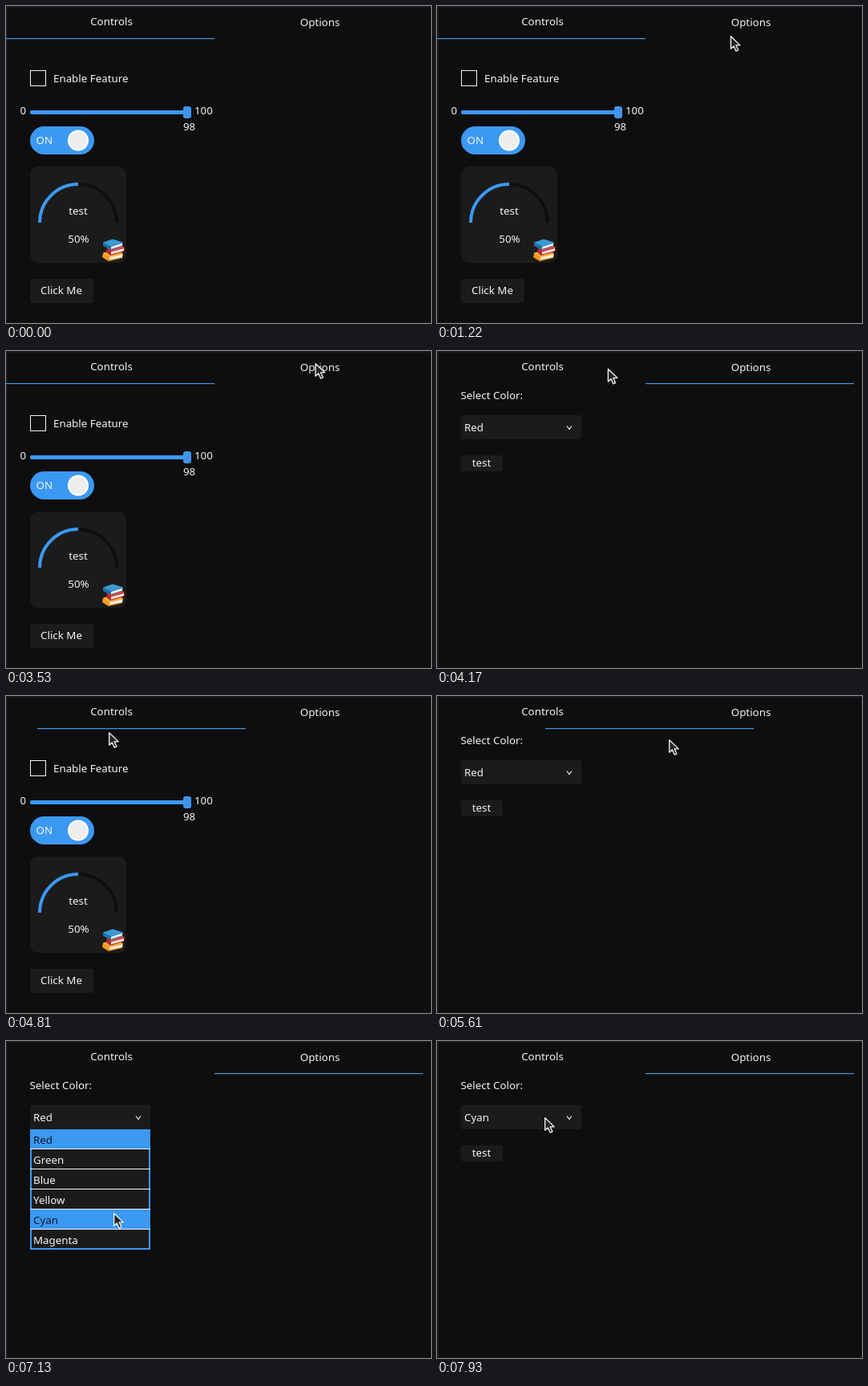
Recreate the animation shown at these times as an HTML page. Size 530 by 395 pixels, loop 8000 ms.

```html
<!DOCTYPE html>
<html lang="en">
<head>
<meta charset="utf-8">
<title>Widget panel</title>
<style>
html, body { margin: 0; width: 100%; height: 100%; overflow: hidden; background: #0e0e0e; }
svg { display: block; width: 530px; height: 395px; }
text { font: 13.33px "Noto Sans", "Open Sans", sans-serif; fill: #f4f4f4; white-space: pre; }
.mid { text-anchor: middle; }
.blue { fill: #3b99f4; }
.card { fill: #1b1b1b; }
</style>
</head>
<body>
<svg viewBox="0 0 530 395" xmlns="http://www.w3.org/2000/svg">
  <defs><clipPath id="clip"><rect id="clipBox" x="29" y="110" width="152" height="150"/></clipPath></defs>
  <rect width="530" height="395" fill="#0e0e0e"/>
  <path d="M0 0H530V2H2V395H0Z" fill="#1a1a1a"/>
  <rect y="393" width="530" height="2" fill="#170f12"/>

  <text class="mid" x="131.5" y="24">Controls</text>
  <text class="mid" x="391.5" y="25">Options</text>
  <rect id="line" y="40" width="260" height="1.2"/>

  <g id="controls">
    <rect x="30.5" y="80.5" width="19" height="19" fill="none" stroke="#f4f4f4"/>
    <text x="59" y="95">Enable Feature</text>

    <text x="17.5" y="135">0</text>
    <text x="235" y="135">100</text>
    <rect class="blue" x="30" y="130" width="196" height="5" rx="2"/>
    <rect x="221" y="125" width="10" height="15" rx="3" fill="#4095ea"/>
    <text class="mid" x="228.5" y="155">98</text>

    <rect id="pill" x="30" y="150" width="80" height="35" rx="17.5"/>
    <text id="on" x="37.5">ON</text>
    <text id="off" class="mid" x="85">OFF</text>
    <g id="knob"><circle r="13" fill="#fff"/><circle r="11" fill="#eee"/></g>

    <rect class="card" x="30" y="200" width="120" height="120" rx="10"/>
    <g fill="none" stroke-width="4">
      <path d="M90 222A48 48 0 0 1 138 270" stroke="#0e0e0e"/>
      <path d="M42 270A48 48 0 0 1 90 222" stroke="#3b99f4"/>
    </g>
    <text class="mid" x="90" y="260">test</text>
    <text class="mid" x="90.5" y="295">50%</text>

    <g id="books">
      <path d="M121 308L139 304L146 309L145 314L128 318L120 313Z" fill="#f39a1f"/>
      <path d="M129 313L145 309.5V313L129 316Z" fill="#f2eee4"/>
      <path d="M121 307.5L138 303.5L146 308.5L128 312.5Z" fill="#fbb53c"/>
      <path d="M126 301L141 296L148 302L147 306L130 311L125 307Z" fill="#b5282f"/>
      <path d="M131 306.5L147 302V305L131 309.5Z" fill="#f2e8e4"/>
      <path d="M126 300.5L141 296L148 301L131 306Z" fill="#dc4a45"/>
      <path d="M121 295L133 291L146 295L145 299L131 304L121 299Z" fill="#1d6fa8"/>
      <path d="M131 300L145 295.5V298.5L131 303Z" fill="#e9eff2"/>
      <path d="M121 294.5L133 290.5L146 294.5L131 299.5Z" fill="#3a9bd5"/>
    </g>

    <rect class="card" x="30" y="340" width="79" height="30" rx="2"/>
    <text class="mid" x="69" y="359">Click Me</text>
  </g>

  <g id="options">
    <text x="29.5" y="60">Select Color:</text>
    <rect class="card" x="30" y="80" width="150" height="30" rx="2"/>
    <text id="value" x="34" y="100"></text>
    <path d="M162 93.5L165 97.5L168 93.5" fill="none" stroke="#f4f4f4" stroke-width="1.2"/>
    <rect class="card" x="30" y="130" width="52" height="20" rx="2"/>
    <text class="mid" x="55.5" y="144">test</text>
    <g id="menu" clip-path="url(#clip)"></g>
  </g>

  <path id="cursor" d="M.7 .8V16.3L4.3 13L7.2 19.2L10 18L7.2 11.9H12.2Z" fill="#262626" stroke="#f6f6f6" stroke-width="1.3" stroke-linejoin="round"/>
</svg>
<script>
const $ = id => document.getElementById(id);
const set = (el, attrs) => { for (const k in attrs) el.setAttribute(k, attrs[k]); };
const clamp = v => Math.max(0, Math.min(1, v));
const span = (t, start, len) => clamp((t - start) / len);
const inOut = u => u < .5 ? 2 * u * u : 1 - 2 * (1 - u) ** 2;

const LOOP = 8000, STEP = 80;
const COLORS = ['Red', 'Green', 'Blue', 'Yellow', 'Cyan', 'Magenta'];

// pointer path: time, x, y
const PATH = [
  [260, 518, 318], [500, 310, 220], [660, 206, 110], [860, 320, 50], [1060, 408, 23],
  [1140, 411, 16], [1460, 230, 100], [1700, 90, 158], [1940, 66, 166], [2180, 65.5, 166],
  [2580, 63, 175], [2660, 63, 175], [2740, 64, 175], [2820, 64, 175], [3140, 200, 90],
  [3460, 385, 15], [3690, 386, 15], [4410, 126, 25], [4570, 128, 32], [4810, 128, 45],
  [5130, 250, 50], [5370, 385, 34], [5450, 375, 33], [5610, 289, 54], [6010, 137, 92],
  [6490, 137, 92], [6730, 137.5, 139], [7130, 134, 214], [7210, 134, 214], [7930, 134, 95]
];

// tab clicks: time, slide length, tab index
const TABS = [[3613, 400, 1], [4510, 413, 0], [5428, 357, 1]];

function make(tag, attrs) {
  const el = document.createElementNS('http://www.w3.org/2000/svg', tag);
  set(el, attrs);
  $('menu').append(el);
  return el;
}

const items = COLORS.map((name, i) => {
  const y = 110 + i * 25;
  const box = make('rect', { x: 30, y, width: 150, height: 25 });
  const label = make('text', { x: 34, y: y + 18 });
  label.textContent = name;
  return { box, label };
});
make('path', { d: 'M31 110V259H179V110', fill: 'none', stroke: '#3b99f4', 'stroke-width': 2 });
for (let i = 1; i < COLORS.length; i++)
  make('rect', { x: 30, y: 109 + i * 25, width: 150, height: 1, fill: '#f4f4f4' });

function tick(t) {
  if (t < 260) return 0;
  const base = t < 3530 ? 260 : 3530;
  return base + Math.floor((t - base) / STEP) * STEP;
}

function pointer(t) {
  let i = 0;
  while (i < PATH.length - 2 && PATH[i + 1][0] <= t) i++;
  const [t0, x0, y0] = PATH[i], [t1, x1, y1] = PATH[i + 1];
  const u = span(t, t0, t1 - t0);
  return [x0 + (x1 - x0) * u, y0 + (y1 - y0) * u];
}

function drawTabs(t) {
  let x = 0, tab = 0;
  for (const [start, len, to] of TABS) {
    if (t < start) break;
    x += (to * 260 - x) * inOut(span(t, start, len));
    tab = to;
  }
  set($('line'), { x, fill: tab ? '#4b92dc' : '#3f97ec' });
  $('controls').style.display = tab ? 'none' : '';
  $('options').style.display = tab ? '' : 'none';
}

function drawToggle(t) {
  const back = t > 2340;
  const p = back ? span(t, 2340, 240) : span(t, 2060, 240);
  const ease = 1 - (1 - p) ** 2.5;
  const off = back ? 1 - p : p;
  const isOn = back || p === 0;
  set($('pill'), { fill: isOn ? '#3b99f4' : '#1b1b1b' });
  set($('knob'), { transform: `translate(${back ? 50 + 40 * ease : 90 - 40 * ease} 167.5)` });
  const size = (id, k) => {
    $(id).style.fontSize = 13.33 * k + 'px';
    $(id).style.display = k > .02 ? '' : 'none';
    set($(id), { y: 167.5 + 4.8 * k });
  };
  size('on', 1 - off);
  size('off', off);
}

function drawMenu(t, y) {
  const chosen = t >= 7290 ? 4 : 0;
  const open = span(t, 6090, 240) - span(t, 7210, 240);
  const hover = y >= 110 && t < 7450 ? Math.floor((y - 110) / 25) : -1;
  $('value').textContent = COLORS[chosen];
  $('menu').style.display = open > 0 ? '' : 'none';
  set($('clipBox'), { height: 150 * open });
  items.forEach(({ box, label }, i) => {
    const lit = i === chosen || i === hover;
    set(box, { fill: lit ? '#3b99f4' : '#1b1b1b' });
    label.style.fill = lit ? '#101820' : '#f4f4f4';
  });
}

function draw(time) {
  const t = tick(time % LOOP);
  const [x, y] = pointer(t);
  drawTabs(t);
  drawToggle(t);
  drawMenu(t, y);
  $('cursor').style.display = t < 260 ? 'none' : '';
  set($('cursor'), { transform: `translate(${x} ${y})` });
}

const begin = performance.now();
function loop() {
  draw(performance.now() - begin);
  requestAnimationFrame(loop);
}
loop();
</script>
</body>
</html>
```
